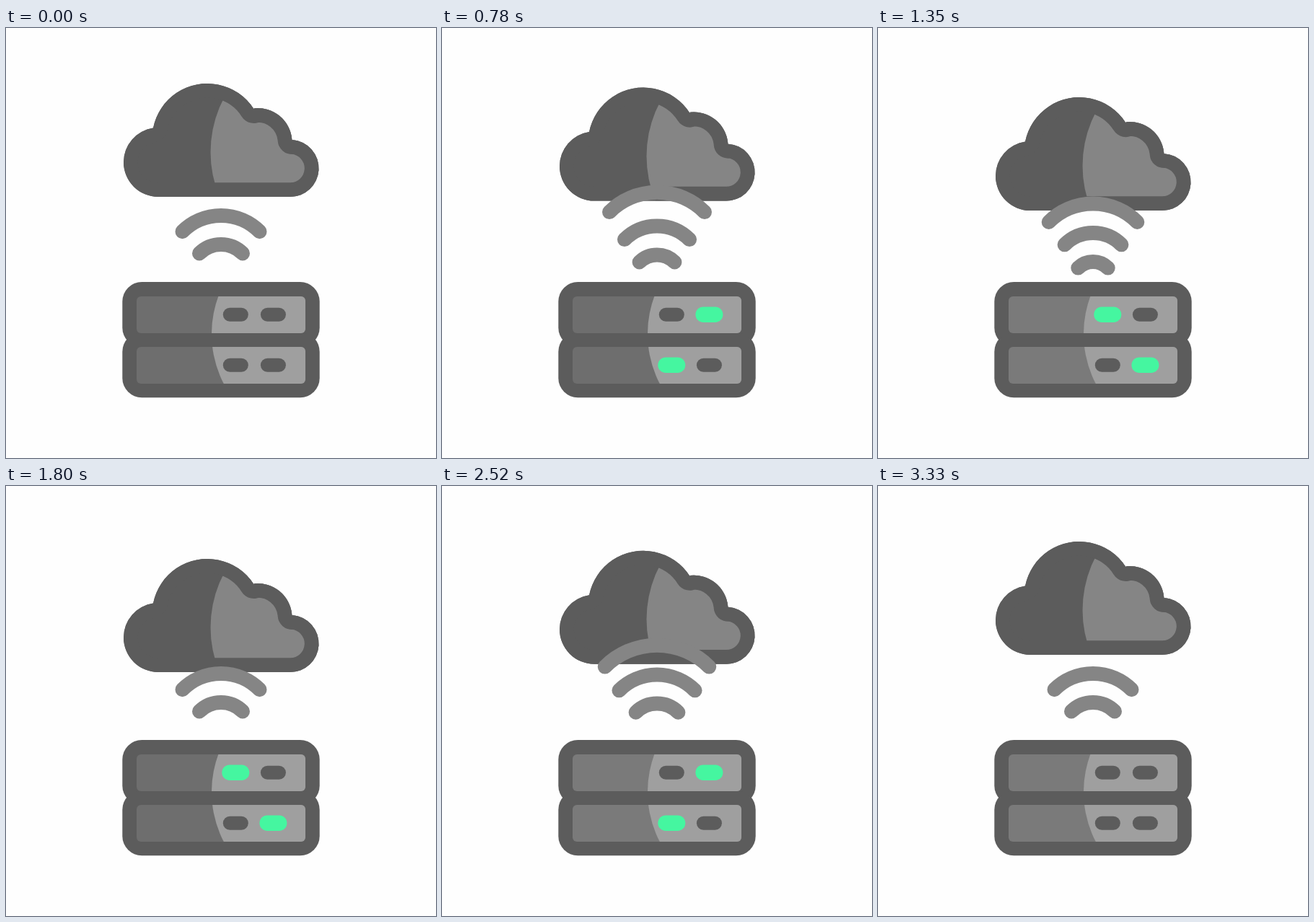
An HTML page with a canvas that plays this animation: 596x596 px, repeating every 3.6 s.

```html
<!DOCTYPE html>
<html lang="en">
<head>
<meta charset="utf-8">
<title>Cloud server</title>
<style>
  html, body { margin: 0; width: 100%; height: 100%; overflow: hidden; background: #fefefe; }
  canvas { display: block; }
</style>
</head>
<body>
<canvas id="stage" width="596" height="596"></canvas>
<script>
const ctx = document.getElementById('stage').getContext('2d');
const LOOP = 3600, STEP = 30, START = 300, RUN = 3000, WAVE = 750;
const DARK = '#5c5c5c', MID = '#858585', PALE = '#9f9f9f', GREEN = '#45f6a0';
const TAU = Math.PI * 2;

const lerp = (a, b, p) => a + (b - a) * p;

function roundBox(x, y, w, h, r, color) {
  ctx.fillStyle = color;
  ctx.beginPath();
  ctx.roundRect(x, y, w, h, r);
  ctx.fill();
}

// Outline built clockwise from four lobes and the notches between them.
function makeCloud() {
  const lobes = [[211, 186, 48], [279, 153.5, 76.5], [349, 158.5, 47.5], [394, 194.5, 39.5]];
  const notches = [[204, 138.5], [344, 112], [396.5, 155.3]];
  const path = new Path2D();
  lobes.forEach(([x, y, r], i) => {
    const angle = p => p ? Math.atan2(p[1] - y, p[0] - x) : Math.PI / 2;
    path.arc(x, y, r, angle(notches[i - 1]), angle(notches[i]));
  });
  path.closePath();
  return path;
}
const cloud = makeCloud();

function drawCloud(dy) {
  ctx.save();
  ctx.translate(0, dy);
  ctx.fillStyle = DARK;
  ctx.fill(cloud);
  ctx.clip(cloud);
  ctx.fillStyle = MID;
  ctx.beginPath();
  ctx.arc(444, 172, 160.5, 0, TAU);
  ctx.fill();
  ctx.strokeStyle = DARK;
  ctx.lineWidth = 39.5;
  ctx.lineJoin = 'round';
  ctx.stroke(cloud);
  ctx.restore();
}

// Crest height and half width of a wave after each full period of its life.
const CREST = [340, 300, 260, 219];
const HALF = [14.5, 30, 53.5, 73];

function drawWave(i, p, dy) {
  const r = lerp(HALF[i], HALF[i + 1], p) * Math.SQRT2;
  const top = lerp(CREST[i], CREST[i + 1], p) + dy;
  ctx.strokeStyle = MID;
  ctx.lineWidth = 20;
  ctx.lineCap = 'round';
  ctx.beginPath();
  ctx.arc(298, top + r, r, -Math.PI * 0.75, -Math.PI * 0.25);
  ctx.stroke();
}

function drawWaves(time) {
  const p = (time % WAVE) / WAVE;
  const lift = time < WAVE ? -time / 80 : 0;
  if (p > 0) drawWave(0, p, 0);
  drawWave(1, p, 0);
  drawWave(2, p, lift);
}

function drawLed(x, y, on) {
  const w = on ? 38 : 35, h = on ? 21.5 : 19;
  roundBox(x - w / 2, y - h / 2, w, h, h / 2, on ? GREEN : DARK);
}

// lit: 0 none, 1 left, 2 right
function drawUnit(y, panel, lit) {
  roundBox(181, y, 234, 51, 6, panel);
  ctx.save();
  ctx.beginPath();
  ctx.roundRect(181, y, 234, 51, 6);
  ctx.clip();
  ctx.fillStyle = PALE;
  ctx.beginPath();
  ctx.arc(435, 424, 150, 0, TAU);
  ctx.fill();
  ctx.restore();
  drawLed(318.3, y + 25.2, lit === 1);
  drawLed(370.4, y + 25.2, lit === 2);
}

function drawServer(panel, lit) {
  roundBox(161.3, 352, 273.4, 90.5, 27, DARK);
  roundBox(161.3, 421.7, 273.4, 90.5, 27, DARK);
  drawUnit(372, panel, lit);
  drawUnit(442, panel, lit && 3 - lit);
}

function draw(ms) {
  const now = Math.floor((ms % LOOP) / STEP) * STEP;
  const time = Math.min(Math.max(now - START, 0), RUN);
  const ledTime = now - START - STEP;
  const running = ledTime >= 0 && ledTime < RUN;
  const lit = running ? 2 - Math.floor(ledTime / WAVE) % 2 : 0;
  const bright = Math.floor(time / 600) % 2 === 1;

  ctx.fillStyle = '#fefefe';
  ctx.fillRect(0, 0, 596, 596);
  drawCloud(12 * (1 - Math.cos(TAU * time / RUN)));
  drawWaves(time);
  drawServer(bright ? '#7a7a7a' : '#6e6e6e', lit);
}

const origin = performance.now();
function tick() {
  draw(performance.now() - origin);
  requestAnimationFrame(tick);
}
tick();
</script>
</body>
</html>
```
